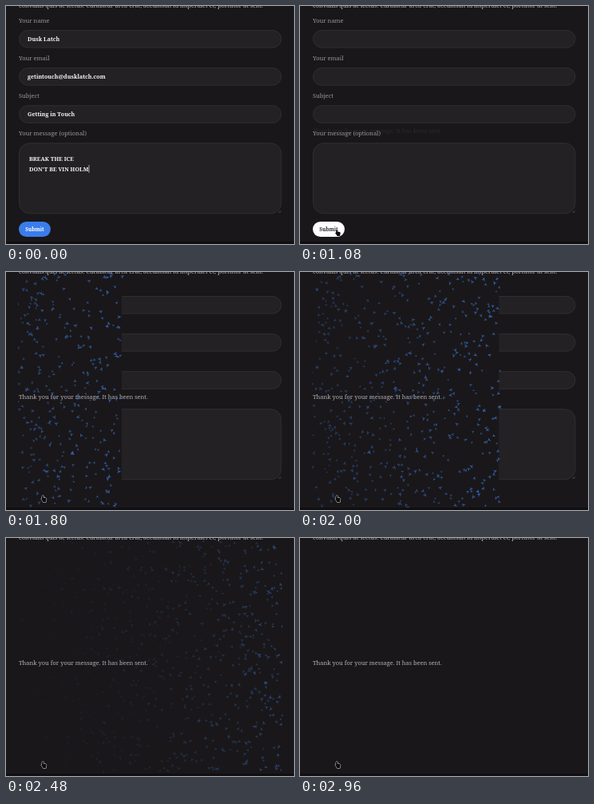
An HTML page with a canvas that plays this animation: 361x298 px, repeating every 3000 ms.

```html
<!DOCTYPE html>
<html lang="en">
<head>
<meta charset="utf-8">
<title>Contact form</title>
<style>
  html, body { margin: 0; width: 100%; height: 100%; overflow: hidden; background: #191719; }
  canvas { display: block; }
</style>
</head>
<body>
<canvas id="stage" width="361" height="298"></canvas>
<script>
const ctx = document.getElementById('stage').getContext('2d');
const LOOP = 3000, STEP = 40;
const SENT = 1080, SWEEP = 1382, SWEEP_TIME = 970;
const LEFT = 16, WIDTH = 329;
const LABEL = '#98969a', BODY = '#b2b0b3', BLUE = '#3f79dc';

const clamp = v => Math.min(1, Math.max(0, v));
const mix = (a, b, p) => a + (b - a) * p;
const ease = p => (1 - Math.cos(Math.PI * clamp(p))) / 2;

let seed = 7;
function rand(min, max) {
  seed = (seed * 16807) % 2147483647;
  return mix(min, max, seed / 2147483647);
}

// Particles leave the sweeping edge, spread almost evenly over the width.
const bits = Array.from({ length: 820 }, () => {
  const r = rand(0, 1);
  const s = mix(r, Math.acos(1 - 2 * r) / Math.PI, 0.75);
  return {
    born: SWEEP + s * SWEEP_TIME,
    life: (1120 - 500 * s) * rand(0.85, 1),
    x: LEFT + WIDTH * ease(s) + rand(-2, 3),
    y: rand(2, 293),
    vx: rand(-0.03, 0.03),
    sway: rand(-7, 7),
    size: rand(1.5, 2.7),
    angle: rand(0, Math.PI * 2)
  };
});

const hand = new Path2D('M45.3 280.4q.9-.9 1.8 0v2.2l2.6 .4q1 .3 1 1.4l-.5 2.2v1.4h-4v-1.1l-2-2.3q-.2-1.2 .9-.9z');

function text(str, x, y, color, size = 7.45, weight = 400) {
  ctx.font = `${weight} ${size}px "Noto Serif", serif`;
  ctx.fillStyle = color;
  ctx.fillText(str, x, y);
  return x + ctx.measureText(str).width;
}

const value = (str, x, y) => text(str, x, y, '#f4f4f5', 7.1, 600);

function box(x, y, w, h, r, fill, line) {
  ctx.beginPath();
  ctx.roundRect(x, y, w, h, r);
  ctx.fillStyle = fill;
  ctx.fill();
  if (line) {
    ctx.strokeStyle = line;
    ctx.lineWidth = 0.8;
    ctx.stroke();
  }
}

const field = (y, h, r) => box(16.5, y, 328.5, h, r, '#232123', '#363336');

function drawForm(t) {
  const rows = [
    ['Your name', 'Dusk Latch'],
    ['Your email', 'getintouch@dusklatch.com'],
    ['Subject', 'Getting in Touch']
  ];
  rows.forEach(([label, entry], i) => {
    const y = i * 47.1;
    text(label, LEFT, 20.7 + y, LABEL);
    field(30.5 + y, 21.6, 10.8);
    if (t < SENT) value(entry, 27, 44.1 + y);
  });

  text('Your message (optional)', LEFT, 162, LABEL);
  field(171.8, 88, 13);
  ctx.strokeStyle = '#77757a';
  ctx.lineWidth = 0.5;
  ctx.beginPath();
  ctx.moveTo(341.5, 259);
  ctx.lineTo(344.5, 256);
  ctx.moveTo(343.2, 259);
  ctx.lineTo(344.5, 257.7);
  ctx.stroke();

  if (t < SENT) {
    value('BREAK THE ICE', 29, 193.6);
    const end = value("DON'T BE VIN HOLM", 29, 206.6);
    if (t < STEP) {
      ctx.fillStyle = '#c8c8ca';
      ctx.fillRect(end + 0.2, 199, 0.8, 10);
    }
  }

  const p = ease(t / 440);
  const blend = (a, b) => `rgb(${a.map((v, i) => mix(v, b[i], p)).join()})`;
  box(16, 270, 40, 19, 9.5, blend([59, 124, 235], [255, 255, 255]));
  ctx.textAlign = 'center';
  text('Submit', 36, 281.8, blend([255, 255, 255], [45, 43, 48]), 6.4, 600);
  ctx.textAlign = 'left';
}

function drawBits(t) {
  ctx.fillStyle = BLUE;
  for (const b of bits) {
    const age = t - b.born, p = age / b.life;
    if (p < 0 || p >= 1) continue;
    ctx.save();
    ctx.globalAlpha = 0.68 * (1 - p);
    ctx.translate(b.x + b.vx * age, b.y + b.sway * Math.sin(age / 350));
    ctx.rotate(b.angle);
    ctx.beginPath();
    ctx.moveTo(-b.size, 0);
    ctx.lineTo(b.size, -b.size);
    ctx.lineTo(b.size * 0.4, 0);
    ctx.lineTo(b.size, b.size * 0.7);
    ctx.fill();
    ctx.restore();
  }
}

function clipped(x, w, draw) {
  ctx.save();
  ctx.beginPath();
  ctx.rect(x, 0, w, 295);
  ctx.clip();
  draw();
  ctx.restore();
}

function draw(t) {
  ctx.fillStyle = '#191719';
  ctx.fillRect(0, 0, 361, 298);
  ctx.fillStyle = '#120f12';
  ctx.fillRect(0, 295, 361, 3);

  text('convallis quis ac lectus. Curabitur area erat, accumsan id imperdiet et, porttitor at sem.', LEFT, 2.3, BODY, 7.4);

  const sweep = (t - SWEEP) / SWEEP_TIME;
  if (sweep < 1) {
    const edge = sweep > 0 ? LEFT + WIDTH * ease(sweep) : 0;
    clipped(edge, 361 - edge, () => drawForm(t));
  }
  if (t >= SENT) {
    ctx.globalAlpha = clamp((t - SENT + STEP) / 320);
    text('Thank you for your message. It has been sent.', LEFT, 159.2, BODY);
    ctx.globalAlpha = 1;
  }
  clipped(15, 332, () => drawBits(t));

  if (t >= STEP) {
    ctx.strokeStyle = '#f2f2f2';
    ctx.lineWidth = 1;
    ctx.stroke(hand);
    ctx.fillStyle = '#0c0b0d';
    ctx.fill(hand);
  }
}

const start = performance.now();
function tick() {
  const t = (performance.now() - start) % LOOP;
  draw(Math.floor(t / STEP) * STEP);
  requestAnimationFrame(tick);
}
tick();
</script>
</body>
</html>
```
